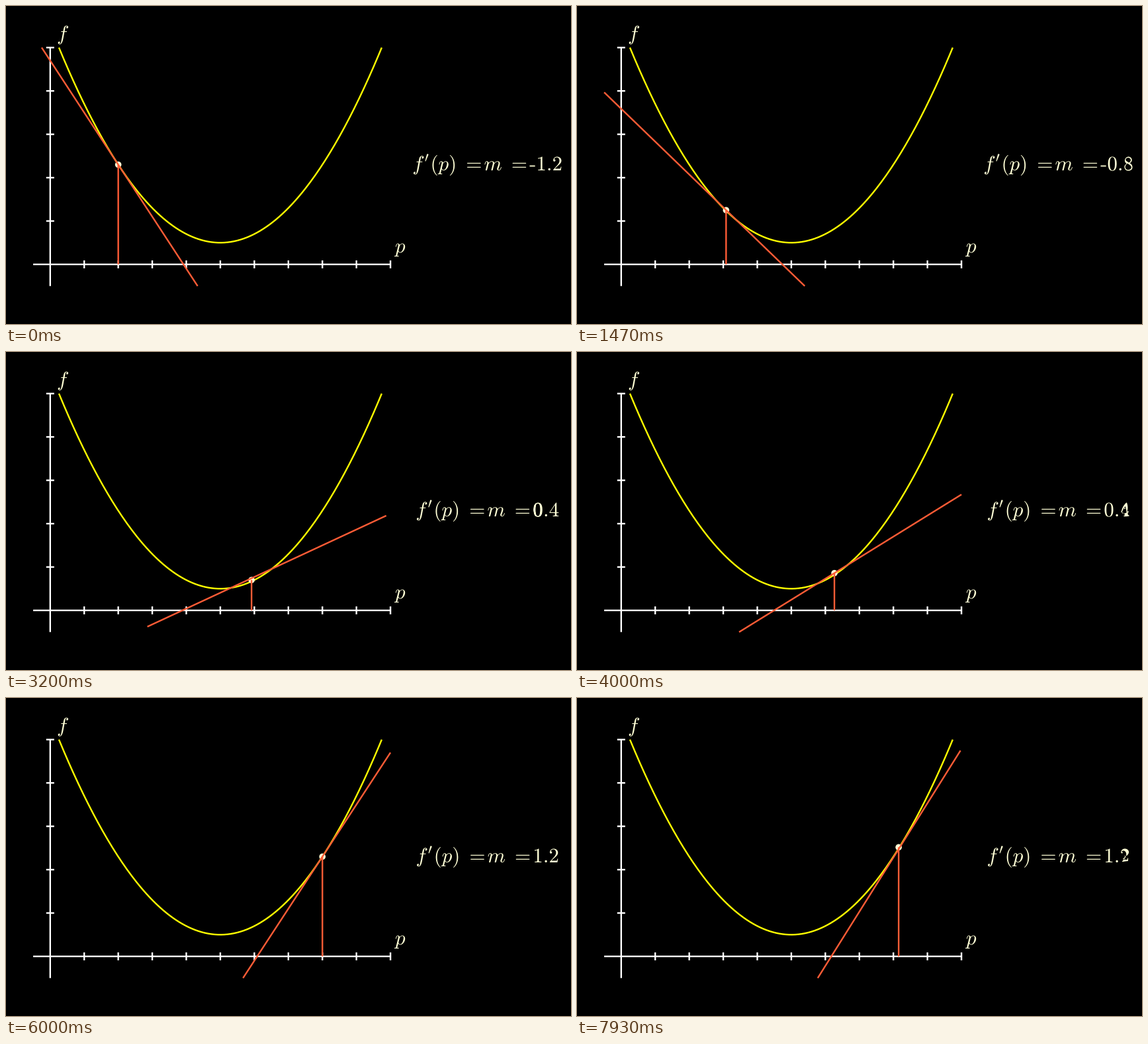
These frames come from a looping animation (854x480 px, 8 s). A matplotlib script:

```python
import numpy as np
import matplotlib.pyplot as plt
from matplotlib.animation import FuncAnimation
from matplotlib.patches import Circle, PathPatch
from matplotlib.path import Path
from matplotlib.textpath import TextPath

W, H, DPI = 854, 480, 64
FRAMES, LOOP = 120, 8000
MOVE, CYCLE = 15, 18            # frames moving, frames per stop
STOPS = [2, 3, 4, 6, 7, 8, 9, 8]

X0, Y0, UX, UY = 66.8, 390.0, 51.43, 65.45
XMIN, XMAX, YMIN, YMAX = -0.5, 10, -0.5, 5

EM = 31
TEXT_X, BASE = 614.3, 248.2
NUMBER_AT = 5.704               # em from the start of the formula
HYPHEN = 0.333
WHITE, CREAM, YELLOW, RED = "#ffffff", "#ffffd6", "#ffff00", "#ff5c36"
STROKE = 2.4 * 72 / DPI

plt.rcParams["mathtext.fontset"] = "cm"
plt.rcParams["path.snap"] = False
plt.rcParams["toolbar"] = "None"

fig = plt.figure(figsize=(W / DPI, H / DPI), dpi=DPI, facecolor="black")
ax = fig.add_axes([0, 0, 1, 1])
ax.set_xlim(0, W)
ax.set_ylim(H, 0)
ax.axis("off")


def px(x, y):
    return X0 + UX * np.asarray(x, float), Y0 - UY * np.asarray(y, float)


def f(x):
    return 0.2 * (x - 5) ** 2 + 0.5


def slope(x):
    return 0.4 * (x - 5)


def smooth(t):
    def sig(u):
        return 1 / (1 + np.exp(-u))
    edge = sig(-5)
    return float(np.clip((sig(10 * (t - 0.5)) - edge) / (1 - 2 * edge), 0, 1))


def stroke(xs, ys, color, z):
    line, = ax.plot(xs, ys, color=color, lw=STROKE, zorder=z,
                    solid_capstyle="butt", solid_joinstyle="round")
    return line


# ---- glyphs ----

def contours(char):
    """Outlines of one character in em units, largest first."""
    if char == "-":
        return [np.array([(.012, .245), (.276, .245), (.276, .187),
                          (.012, .187), (.012, .245)])]
    polys = TextPath((0, 0), f"${char}$", size=100).to_polygons()
    return sorted((p / 100 for p in polys), key=lambda p: -np.ptp(p, axis=0).prod())


def place(polys, x, y, size=EM):
    return [np.array([x, y]) + p * [size, -size] for p in polys]


def compound(polys):
    return Path.make_compound_path(*[Path(p, closed=True) for p in polys])


def text_patch(polys):
    patch = PathPatch(compound(polys), fc=CREAM, ec="none", lw=0, zorder=6)
    ax.add_patch(patch)
    return patch


def resample(poly, n=160):
    """Even points along the outline, starting at its top."""
    ring = poly[:-1] if np.allclose(poly[0], poly[-1]) else poly
    ring = np.roll(ring, -int(np.argmin(ring[:, 1])), axis=0)
    ring = np.vstack([ring, ring[:1]])
    d = np.r_[0, np.cumsum(np.hypot(*np.diff(ring, axis=0).T))]
    s = np.linspace(0, d[-1], n)
    return np.c_[np.interp(s, d, ring[:, 0]), np.interp(s, d, ring[:, 1])]


def label_x(text):
    return TEXT_X + (0 if text[0] == "-" else HYPHEN * EM / 2)


def number_shapes(text):
    x, shapes = label_x(text) + NUMBER_AT * EM, []
    for c in text:
        shapes.append([resample(p) for p in place(contours(c), x, BASE)])
        x += EM * {"-": HYPHEN, ".": 0.278}.get(c, 0.5)
    return shapes


def pad(a, n):
    point = a[-1].mean(axis=0)
    return a + [np.tile(point, (len(a[0]), 1))] * (n - len(a))


def morph(a, b, t):
    n = max(len(a), len(b))
    a = a[:1] * (n - len(a)) + a
    b = b[:1] * (n - len(b)) + b
    out = []
    for ga, gb in zip(a, b):
        m = max(len(ga), len(gb))
        out += [p + (q - p) * t for p, q in zip(pad(ga, m), pad(gb, m))]
    return out


# ---- fixed parts ----

stroke(*px([XMIN, XMAX], [0, 0]), WHITE, 1)
stroke(*px([0, 0], [YMIN, YMAX]), WHITE, 1)
for i in range(1, 11):
    x, y = px(i, 0)
    stroke([x, x], [y - 6, y + 6], WHITE, 1)
for i in range(1, 6):
    x, y = px(0, i)
    stroke([x - 6, x + 6], [y, y], WHITE, 1)

reach = np.sqrt((YMAX - 0.5) / 0.2)
curve = np.linspace(5 - reach, 5 + reach, 200)
stroke(*px(curve, f(curve)), YELLOW, 2)

text_patch(place(contours("f"), 77, 51.6))
text_patch(place(contours("p"), 588, 372.4))

# TeX spacing of the formula, in em
formula = [("f", 0), ("(", 0.878), ("p", 1.267), (")", 1.770),
           ("=", 2.437), ("m", 3.492), ("=", 4.648)]
prefix = []
for char, at in formula:
    prefix += place(contours(char), at * EM, BASE)
prefix += place(contours(r"\prime"), 0.597 * EM, BASE - 0.413 * EM, 0.7 * EM)

# ---- moving parts ----

dot = Circle((0, 0), 4.8, fc=CREAM, ec="none", lw=0, zorder=3)
ax.add_patch(dot)
drop = stroke([], [], RED, 4)
tangent = stroke([], [], RED, 5)
head = text_patch(prefix)
number = text_patch(prefix)


def tangent_ends(p):
    m = slope(p)
    a, b = sorted(p + (y - f(p)) / m for y in (YMIN, YMAX))
    xs = np.array([max(a, XMIN), min(b, XMAX)])
    return np.array(px(xs, f(p) + m * (xs - p)))


def pose(p):
    text = f"{slope(p):.1f}"
    return dict(ends=tangent_ends(p), dot=np.array(px(p, f(p))),
                head=label_x(text), number=number_shapes(text))


poses = [pose(p) for p in STOPS]


def draw(k):
    i, step = divmod(k, CYCLE)
    t = smooth(min(step / MOVE, 1))
    a, b = poses[i], poses[i + 1]

    def mix(key):
        return a[key] + (b[key] - a[key]) * t

    x, y = mix("dot")
    dot.center = x, y
    drop.set_data([x, x], [y, Y0])
    tangent.set_data(*mix("ends"))
    head.set_path(compound([p + [mix("head"), 0] for p in prefix]))
    number.set_path(compound(morph(a["number"], b["number"], t)))
    return dot, drop, tangent, head, number


anim = FuncAnimation(fig, draw, frames=FRAMES, interval=LOOP / FRAMES,
                     init_func=lambda: draw(0), repeat=True, repeat_delay=0)
plt.show()
```
